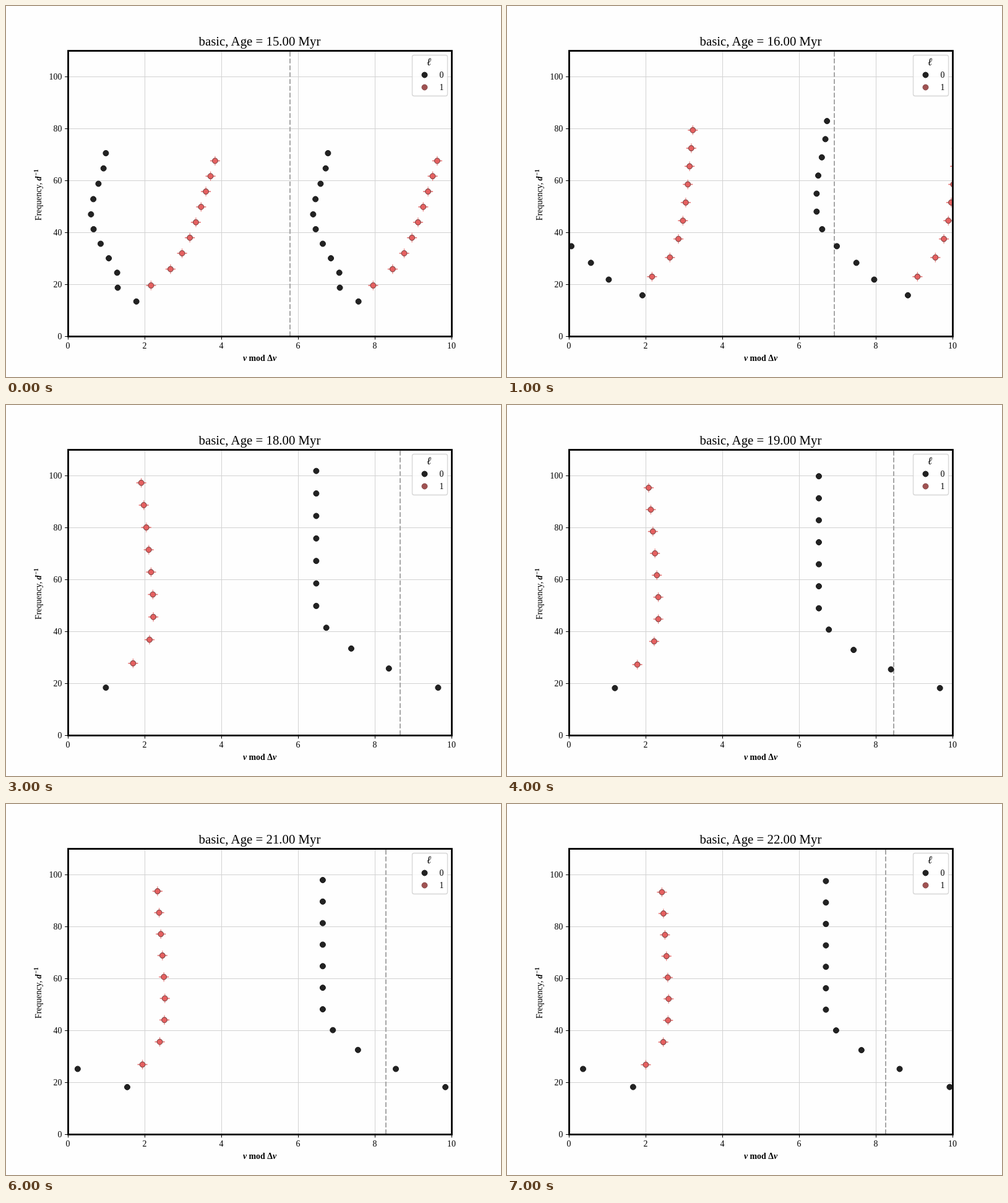
An HTML page that plays this animation: 800 px wide and 600 px high, repeating every 8000 ms.

```html
<!DOCTYPE html>
<html lang="en">
<head>
<meta charset="utf-8">
<title>Echelle diagram</title>
<style>
html, body { margin: 0; width: 100%; height: 100%; overflow: hidden; background: #fefefe; }
svg { display: block; width: 800px; height: 600px; }
text { font-family: "Liberation Serif", "Times New Roman", serif; font-size: 13.89px; fill: #000; }
.b { font-weight: bold; }
.bi { font-weight: bold; font-style: italic; }
</style>
</head>
<body>
<svg viewBox="0 0 800 600">
  <defs>
    <clipPath id="box"><rect x="100" y="72" width="620" height="462"/></clipPath>
    <circle id="l0" r="4.5" fill="#222" stroke="#161616" stroke-width="1"/>
    <circle id="l1" r="4.5" fill="#a05252" stroke="#864a4a" stroke-width="1"/>
    <g id="l1bar">
      <path d="M-8 0H8" stroke="#e25050" stroke-width="1.5" stroke-opacity=".85"/>
      <path d="M0 -7.7V7.7" stroke="#e25050" stroke-width="1.3" stroke-opacity=".65"/>
      <use href="#l1"/>
      <circle r="3.6" fill="#e66060"/>
    </g>
  </defs>
  <rect width="800" height="600" fill="#fefefe"/>
  <path id="grid" stroke="#d2d2d2" stroke-width="1" fill="none"/>
  <path id="ticks" stroke="#000" stroke-width="1.1" fill="none"/>
  <g id="labels"></g>
  <g clip-path="url(#box)">
    <path id="fold" stroke="#a6a6a6" stroke-width="2" stroke-dasharray="7.7 3.33"/>
    <g id="dots"></g>
  </g>
  <rect x="100.5" y="72.5" width="620" height="462" fill="none" stroke="#000" stroke-width="2.78"/>
  <rect x="656.5" y="79.5" width="57" height="66" rx="3" fill="#fff" fill-opacity=".8" stroke="#ccc" stroke-opacity=".8" stroke-width="1.3"/>
  <text class="bi" x="684" y="96" text-anchor="middle" style="font-size:17px">ℓ</text>
  <use href="#l0" x="676.5" y="111.5"/>
  <use href="#l1" x="676.5" y="131.5"/>
  <text x="700.6" y="116">0</text>
  <text x="700.6" y="136">1</text>
  <text id="title" x="410" y="64" text-anchor="middle" style="font-size:20.83px"></text>
  <text x="410" y="574" text-anchor="middle"><tspan class="bi">ν</tspan><tspan class="b"> mod Δ</tspan><tspan class="bi">ν</tspan></text>
  <text transform="translate(57 347) rotate(-90)">Frequency, <tspan class="bi">d</tspan><tspan class="b" dx="1" dy="-5" style="font-size:9.7px">−1</tspan></text>
</svg>
<script>
const $ = id => document.getElementById(id);
const X0 = 100, Y0 = 534, W = 620, H = 462;
const UNIT_X = 62, UNIT_Y = 4.2;
const STEP = 1000, COUNT = 8, FIRST_AGE = 15;

// Key ages: fold width, l=0 base and hook size, l=1 base and slope (px),
// and how far the ridge still has its early shape (0 to 1)
const keys = {
  15: { fold: 359,   base0: 396, hook: 74,  base1: 134, slope: 7.2,  young: 1 },
  16: { fold: 429,   base0: 400, hook: 148, base1: 134, slope: 2.5,  young: .7 },
  17: { fold: 512.4, base0: 397, hook: 196, base1: 112, slope: -3.6, young: 0 },
  18: { fold: 537,   base0: 401, hook: 197, base1: 105, slope: -4.1, young: 0 },
  20: { fold: 519,   base0: 405, hook: 195, base1: 113, slope: -3.1, young: 0 },
  22: { fold: 511.6, base0: 415, hook: 200, base1: 124, slope: -2.5, young: 0 }
};

const clamp = v => Math.min(1, Math.max(0, v));
const smooth = v => (v = clamp(v)) * v * (3 - 2 * v);

// Missing ages settle toward the next key
function modelAt(age) {
  if (keys[age]) return keys[age];
  const a = keys[age - 1], b = keys[age + 1], m = {};
  for (const k in a) m[k] = a[k] + (b[k] - a[k]) * 0.65;
  return m;
}

// A hook at low orders, and while young a dip and an upturn at high orders
function radial(m, i) {
  const y2 = m.young ** 2;
  const hook = m.hook * clamp(1 - i / (4 + 1.5 * y2)) ** (1.8 - 0.6 * y2);
  const dip = 15 * m.young * Math.exp(-3 * (i - 1) ** 2);
  return m.base0 + hook - dip + 24 * m.young * smooth((i - 6) / 4);
}

// A quick rise that settles onto a straight slope
function dipole(m, i) {
  return m.base1 + 46 * (1 - Math.exp(-i * (1.1 - 0.35 * m.young))) + m.slope * i;
}

// Each mode appears once within the fold and again one fold to the right
function ridge(m, curve, count, order, symbol) {
  let out = '';
  for (let i = 0; i < count; i++) {
    const off = curve(m, i);
    const y = Y0 - (off + (order + i) * m.fold) * UNIT_Y / UNIT_X;
    for (let x = off % m.fold, n = 0; n < 2 && x < W + 9; x += m.fold, n++) {
      out += `<use href="#${symbol}" x="${(X0 + x + .4).toFixed(2)}" y="${y.toFixed(2)}"/>`;
    }
  }
  return out;
}

function drawAxes() {
  let grid = '', ticks = '', labels = '';
  for (let v = 0; v <= 10; v += 2) {
    const x = X0 + v * UNIT_X;
    if (v % 10) grid += `M${x + .5} ${Y0}v${-H}`;
    ticks += `M${x + .5} ${Y0}v5.4`;
    labels += `<text x="${x}" y="554" text-anchor="middle">${v}</text>`;
  }
  for (let v = 0; v <= 100; v += 20) {
    const y = Y0 - v * UNIT_Y;
    if (v) grid += `M${X0} ${y + .5}h${W}`;
    ticks += `M${X0} ${y + .5}h-4.9`;
    labels += `<text x="90.4" y="${y + 5}" text-anchor="end">${v}</text>`;
  }
  $('grid').setAttribute('d', grid);
  $('ticks').setAttribute('d', ticks);
  $('labels').innerHTML = labels;
}

function draw(age) {
  const m = modelAt(age);
  $('title').textContent = `basic, Age = ${age.toFixed(2)} Myr`;
  $('fold').setAttribute('d', `M${Math.round(X0 + m.fold)} ${Y0}v${-H}`);
  $('dots').innerHTML = ridge(m, radial, 11, 1, 'l0') + ridge(m, dipole, 9, 3, 'l1bar');
}

let start, shown;
function tick(now) {
  start ??= now;
  const age = FIRST_AGE + Math.floor((now - start) / STEP) % COUNT;
  if (age !== shown) draw(shown = age);
  requestAnimationFrame(tick);
}

drawAxes();
draw(shown = FIRST_AGE);
requestAnimationFrame(tick);
</script>
</body>
</html>
```
